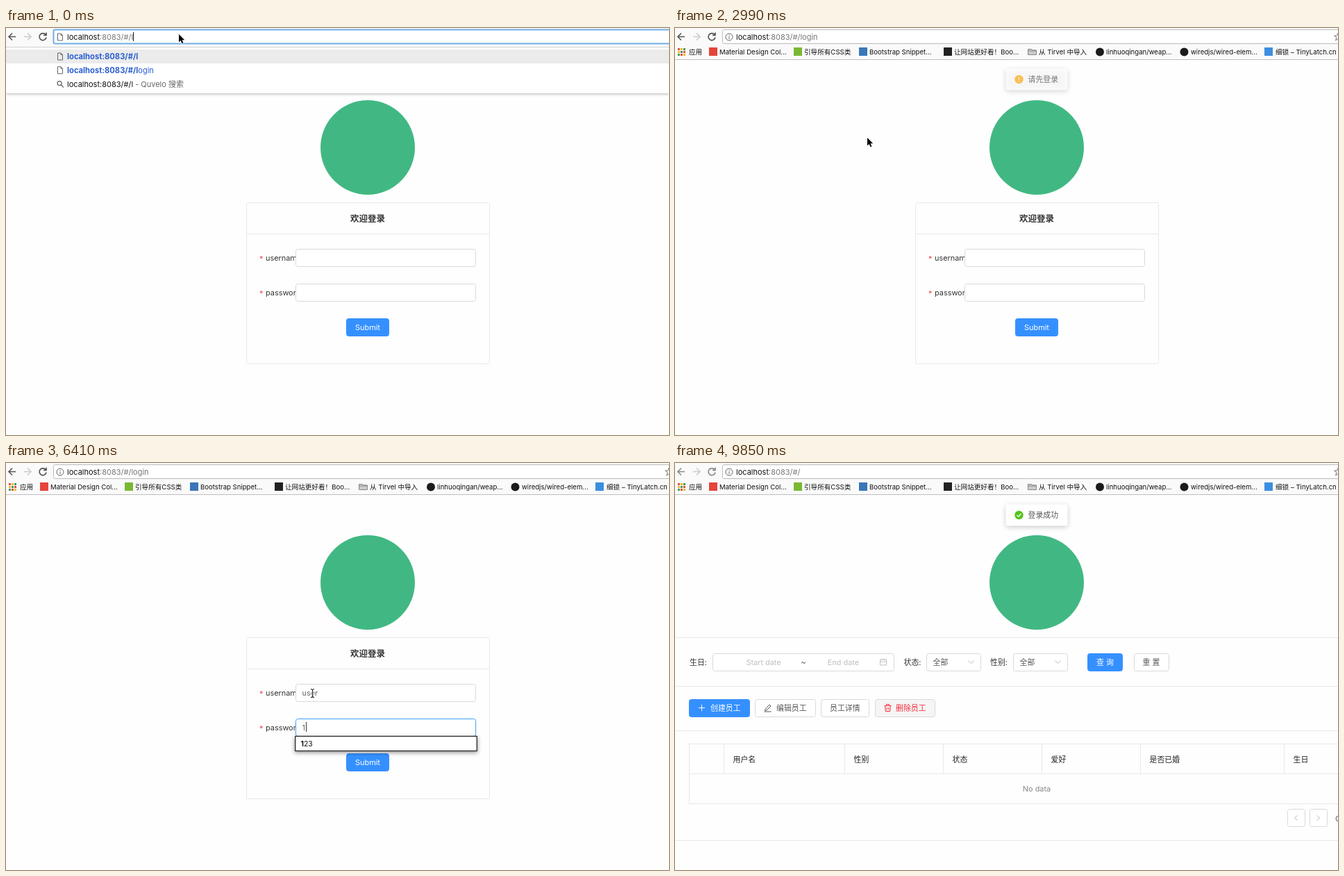
An HTML page with a canvas that plays this animation: 955x586 px, repeating every 9950 ms.

```html
<!DOCTYPE html>
<html lang="zh">
<head>
<meta charset="utf-8">
<style>
html, body { margin: 0; width: 100%; height: 100%; overflow: hidden; background: #fefefe; }
canvas { display: block; }
</style>
</head>
<body>
<canvas id="stage" width="955" height="586"></canvas>
<script>
const ctx = document.getElementById('stage').getContext('2d');
const LOOP = 9950;
const FONT = 'Inter, "Noto Sans CJK SC", "Noto Sans CJK", sans-serif';
const PAGE = '#fefefe', BLUE = '#3590ff', LINE = '#e8e8e8', EDGE = '#d9d9d9', INK = '#333';
const ROOT = 'localhost:8083/#/';

// Last entry whose start time has passed
const at = (steps, t) => steps.filter(s => s[0] <= t).pop();

// Draws text centred on y and returns its right end
function text(s, x, y, color = INK, size = 10.9, weight = 400, align = 'left') {
  ctx.font = `${weight} ${size}px ${FONT}`;
  ctx.textAlign = align;
  ctx.fillStyle = color;
  ctx.fillText(s, x, y + size * .37);
  return x + ctx.measureText(s).width;
}
function rect(x, y, w, h, color) {
  ctx.fillStyle = color;
  ctx.fillRect(x, y, w, h);
}
function box(x, y, w, h, fill, stroke, radius = 3, width = 1) {
  ctx.beginPath();
  ctx.roundRect(x + .5, y + .5, w - 1, h - 1, radius);
  ctx.fillStyle = fill;
  ctx.fill();
  if (stroke) {
    ctx.strokeStyle = stroke;
    ctx.lineWidth = width;
    ctx.stroke();
  }
}
function disc(x, y, r, color) {
  ctx.beginPath();
  ctx.arc(x, y, r, 0, 7);
  ctx.fillStyle = color;
  ctx.fill();
}
function stroke(d, x, y, color, width = 1) {
  ctx.save();
  ctx.translate(x, y);
  ctx.strokeStyle = color;
  ctx.lineWidth = width;
  ctx.stroke(new Path2D(d));
  ctx.restore();
}
function withShadow(alpha, blur, dy, draw) {
  ctx.save();
  ctx.shadowColor = `rgba(0,0,0,${alpha})`;
  ctx.shadowBlur = blur;
  ctx.shadowOffsetY = dy;
  draw();
  ctx.restore();
}

const ICON = {
  back: 'M5 0H-5M0-5L-5 0L0 5',
  forward: 'M-5 0H5M0-5L5 0L0 5',
  reload: 'M4-3A5 5 0 1 0 5 1M5-6V-2H1',
  page: 'M-3.5-5H1L3.5-2.5V5H-3.5ZM1-5V-2.5H3.5',
  info: 'M-5 0A5 5 0 1 0 5 0A5 5 0 1 0-5 0M0-.8V3M0-3V-1.8',
  search: 'M-4-1A3 3 0 1 0 2-1A3 3 0 1 0-4-1M1.2 1.2L5 5',
  star: 'M4-6L5.4-2H9.5L6.2.5L7.4 5L4 2.4L.6 5L1.8.5L-1.5-2H2.6Z',
  folder: 'M-6-4H-1L0-2.5H6V4H-6ZM-6-1.5H6',
  down: 'M-4-2L0 2L4-2',
  calendar: 'M-4.5-3.5H4.5V4.5H-4.5ZM-4.5-.5H4.5M-2-5V-2.5M2-5V-2.5',
  plus: 'M-4.5 0H4.5M0-4.5V4.5',
  pencil: 'M-3.5 2L2.5-4.5L4.5-2.5L-1.5 3.5L-4 4ZM-5 5.5H5',
  trash: 'M-5-3H5M-2-3V-5H2V-3M-3.8-3L-3.2 5H3.2L3.8-3M-1.3-.5V3M1.3-.5V3',
  check: 'M-3 0L-.8 2.2L3-2',
  bang: 'M0-3.2V.8M0 2V3.3',
  prev: 'M2-3.5L-2 0L2 3.5',
  next: 'M-2-3.5L2 0L-2 3.5'
};
const icon = (name, x, y, color = '#555', width = 1) => stroke(ICON[name], x, y, color, width);

function url(path, x, y) {
  return text(path, text('localhost', x, y, '#111', 11), y, '#777', 11);
}

function addressBar(t) {
  const typing = t < 1340;
  const nav = t >= 9850 ? '#888' : '#555';
  rect(0, 0, 955, 27, '#fafafa');
  icon('back', 9, 12.5, nav, 1.6);
  icon('forward', 31, 12.5, '#ccc', 1.6);
  icon('reload', 53, 12.5, nav, 1.7);
  box(68, 2, 900, 21, '#fff', typing ? '#72aee6' : '#bbb', 2, typing ? 2 : 1);
  icon(typing ? 'page' : 'info', 78, 13, '#666');
  const path = at([[0, ':8083/#/l'], [150, ':8083/#/'], [1340, ':8083/#/login'], [8350, ':8083/#/']], t)[1];
  const end = url(path, 88, 12.5);
  if (t < 740) rect(Math.round(end), 6, 1, 13, '#111');
  if (!typing) icon('star', 951, 13, '#777');
}

function suggestions(t) {
  const tails = at([[0, ['l', 'l|ogin']], [150, ['', '|login']], [300, ['', '|login', '|l', '|home']]], t)[1];
  const typed = t < 150 ? ROOT + 'l' : ROOT;
  const bottom = 34 + 20 * (tails.length + 1);
  withShadow(.3, 4, 1, () => rect(0, 28, 955, bottom - 28, '#fff'));
  rect(0, 27, 955, 1, '#d0d0d0');
  rect(0, 31, 955, 20, '#ebebeb');
  tails.forEach((tail, i) => {
    const y = 41 + 19.8 * i, [bold, rest = ''] = tail.split('|');
    icon('page', 78, y, '#666');
    text(rest, text(ROOT + bold, 88, y, '#2b5fd0', 11.2, 700), y, '#2b5fd0', 11);
  });
  const y = 41 + 19.8 * tails.length;
  icon('search', 78, y, '#666', 1.3);
  text(' - Quvelo 搜索', text(typed, 88, y, '#111', 11), y, '#666', 11);
}

function bookmarks() {
  const label = (s, x) => text(s, x, 34.5, '#111', 9.6);
  const square = (x, color) => rect(x, 28, 12, 12, color);
  rect(0, 24, 955, 21, '#fafafa');
  rect(0, 45, 955, 1, '#bdbdbd');
  const dots = ['#e2513f', '#f0b72e', '#3f9d58'];
  for (let i = 0; i < 9; i++) rect(4 + i % 3 * 4, 29 + (i / 3 | 0) * 4, 3, 3, dots[(i + (i / 3 | 0)) % 3]);
  label('应用', 20);
  square(49, '#e5443b');
  label('Material Design Col...', 64);
  square(171, '#7ab833');
  label('引导所有CSS类', 186);
  square(265, '#3a76b8');
  label('Bootstrap Snippet...', 280);
  square(387, '#222');
  label('让网站更好看！Boo...', 402);
  rect(509, 31, 11, 7, '#ccc');
  icon('folder', 514.5, 34.5, '#888');
  label('从 Tirvel 中导入', 524);
  disc(612, 34.5, 6, '#1b1b1b');
  label('linhuoqingan/weap...', 621);
  disc(733.5, 34.5, 6, '#1b1b1b');
  label('wiredjs/wired-elem...', 743);
  square(849, '#3c8ee0');
  label('细锁 – TinyLatch.cn', 865);
}

function field(y, value, focus, caret) {
  if (focus) box(416, y - 1, 262, 28, `rgba(53,144,255,${.22 * focus})`, null, 5);
  box(417, y, 260, 26, '#fff', focus ? (focus < 1 ? '#a5cdf5' : '#4da8f8') : EDGE);
  const end = text(value, 426.5, y + 13, '#666');
  if (caret) rect(Math.round(end) + (value ? 1 : 0), y + 5, 1, 14, '#333');
}

function popup(y, rows, typed, alpha = 1) {
  const h = 19 * rows.length + 3;
  ctx.save();
  ctx.globalAlpha = alpha;
  withShadow(.45, 6, 2, () => rect(416, y, 263, h, '#fff'));
  ctx.strokeStyle = '#2a2a2a';
  ctx.lineWidth = 1.3;
  ctx.strokeRect(416.7, y + .5, 261.6, h - 1);
  rows.forEach((row, i) => {
    const ry = y + 11.5 + 19 * i;
    text(row.slice(typed), text(row.slice(0, typed), 424.5, ry, '#111', 10.4, 700), ry, '#111', 10.4);
  });
  ctx.restore();
}

function loginPage(t) {
  box(346, 251, 351, 233, PAGE, LINE, 2);
  rect(346, 296, 350, 1, LINE);
  text('欢迎登录', 521, 274.5, INK, 12.5, 600, 'center');
  [['username', 331], ['password', 381]].forEach(([name, y]) => {
    text('*', 365, y + 1, '#f04455', 11);
    text(name, 374, y, INK);
  });

  const name = 'user'.slice(0, at([[0, 0], [4630, 1], [4780, 2], [4930, 3], [5070, 4]], t)[1]);
  const pass = '123'.slice(0, at([[0, 0], [6410, 1], [6560, 2], [6710, 3]], t)[1]);
  const nameFocus = at([[0, 0], [3590, .5], [3740, 1], [5660, .5], [5810, 0]], t)[1];
  const passFocus = at([[0, 0], [5660, .5], [5810, 1], [7910, .5], [8050, 0]], t)[1];
  const nameCaret = t >= 3740 && t < 4180 || t >= 4630 && t < 5510;
  const passCaret = t >= 5810 && t < 6110 || t >= 6410 && t < 7310;
  field(318, name, nameFocus, nameCaret);
  field(368, pass, passFocus, passCaret);

  const button = at([[0, BLUE], [7910, '#2380f0'], [8050, '#58a6ff']], t)[1];
  box(490, 418, 62, 26, button, button);
  text('Submit', 521, 430.5, '#fff', 10.9, 400, 'center');

  if (t >= 3880 && t < 4630) popup(344, ['user', 'admin', 'guest', 'editor', 'root', 'viewer'], 0, t < 4180 ? .94 : 1);
  if (t >= 4630 && t < 5510) popup(344, ['user'], name.length);
  if (t >= 6410 && t < 7910) popup(393, ['123'], pass.length);
}

function homePage(t) {
  for (const y of [251, 321, 385, 543]) rect(0, y, 955, 1, LINE);

  text('生日:', 21, 287);
  box(54, 274, 262, 26, '#fff', EDGE);
  text('Start date', 127.5, 287, '#bfbfbf', 10.9, 400, 'center');
  text('~', 185, 287, '#666', 10.9, 400, 'center');
  text('End date', 242.5, 287, '#bfbfbf', 10.9, 400, 'center');
  icon('calendar', 300, 286.5, '#bfbfbf');
  [['状态:', 329.5, 362], ['性别:', 454, 487]].forEach(([label, x, left]) => {
    text(label, x, 287);
    box(left, 274, 79, 26, '#fff', EDGE);
    text('全部', left + 9.5, 287, '#555');
    icon('down', left + 64.5, 286.5, '#bbb');
  });

  const button = (x, y, w, label, textX, color, fill, edge, mark) => {
    box(x, y, w, 26, fill, edge);
    text(label, textX, y + 13, color);
    if (mark) icon(mark, x + 18.5, y + 12.5, color);
  };
  button(594, 274, 51, '查 询', 607, '#fff', BLUE, BLUE);
  button(661, 274, 51, '重 置', 673.5, '#555', '#fff', EDGE);
  button(20, 340, 88, '创建员工', 51, '#fff', BLUE, BLUE, 'plus');
  button(115, 340, 88, '编辑员工', 146, '#555', '#fff', EDGE, 'pencil');
  button(210, 340, 70, '员工详情', 223, '#555', '#fff', EDGE);
  button(288, 340, 87, '删除员工', 318, '#f52f3e', '#f5f5f5', EDGE, 'trash');

  ctx.save();
  if (t < 8650) ctx.globalAlpha = .5;
  for (const y of [404, 447, 490]) rect(20, y, 935, 1, LINE);
  rect(20, 404, 1, 86, LINE);
  [[70, ''], [244, '用户名'], [386, '性别'], [528, '状态'], [670, '爱好'], [877, '是否已婚'], [955, '生日']]
    .forEach(([right, label], i, cols) => {
      rect(right, 404, 1, 43, LINE);
      if (i) text(label, cols[i - 1][0] + 13.5, 426.5, '#222', 10.9, 500);
    });
  text('No data', 521, 469, '#888', 10.9, 400, 'center');
  ctx.restore();

  box(882, 498, 26, 26, '#fff', EDGE);
  box(914, 498, 26, 26, '#fff', EDGE);
  icon('prev', 894.5, 511, '#bbb');
  icon('next', 926.5, 511, '#bbb');
  text('Goto', 951, 511.5, '#555');
}

function toast(label, color, mark, y, alpha) {
  ctx.save();
  ctx.globalAlpha = alpha;
  withShadow(.2, 7, 2, () => box(476, y - 16, 90, 32, '#fff', null));
  disc(495.5, y, 6.2, color);
  icon(mark, 495.5, y, '#fff', 1.3);
  text(label, 508.5, y, '#555');
  ctx.restore();
}

function toasts(t) {
  const [, y, alpha] = at([[0, 0, 0], [1490, 73, .9], [1640, 75, 1], [2990, 74, .8], [3140, 0, 0],
    [8350, 62, .3], [8500, 73, 1], [8650, 75, 1]], t);
  if (!alpha) return;
  if (t < 8350) toast('请先登录', '#fbb02d', 'bang', y, alpha);
  else toast('登录成功', '#52c41a', 'check', y, alpha);
}

const ARROW = new Path2D('M0 0V11.5L2.7 9L4.5 13.2L6.4 12.4L4.6 8.3H8.2Z');
const BEAM = 'M-2.5-6Q0-6 0-4Q0-6 2.5-6M0-4V4M-2.5 6Q0 6 0 4Q0 6 2.5 6';
const POINTER = [
  [0, 249, 9, 'arrow'], [1340, 249.5, 9.5, 'beam'], [2990, 277, 158, 'arrow'], [3140, 365, 262, 'arrow'],
  [3290, 428, 318, 'beam'], [3440, 441.5, 331.5, 'beam'], [7010, 440.5, 360, 'beam'],
  [7160, 438.5, 386, 'beam'], [7310, 437.5, 410, 'arrow'], [7460, 447, 467, 'arrow'],
  [7610, 492, 456, 'arrow'], [7760, 526, 432, 'arrow'], [8950, 567, 427, 'arrow'], [9100, 0, 0, 'none']
];

function pointer(t) {
  const [, x, y, kind] = at(POINTER, t);
  if (kind === 'beam') {
    stroke(BEAM, x, y, '#fff', 2.4);
    stroke(BEAM, x, y, '#222', 1.1);
  } else if (kind === 'arrow') {
    ctx.save();
    ctx.translate(x, y);
    ctx.strokeStyle = '#fff';
    ctx.lineWidth = 1.6;
    ctx.stroke(ARROW);
    ctx.fillStyle = '#000';
    ctx.fill(ARROW);
    ctx.restore();
  }
}

function draw(t) {
  rect(0, 0, 955, 586, PAGE);
  disc(521, 172, 68, '#41b883');
  (t < 8350 ? loginPage : homePage)(t);
  toasts(t);
  if (t >= 1340) bookmarks();
  else suggestions(t);
  addressBar(t);
  pointer(t);
}

const start = performance.now();
function tick() {
  draw((performance.now() - start) % LOOP);
  requestAnimationFrame(tick);
}
tick();
</script>
</body>
</html>
```
